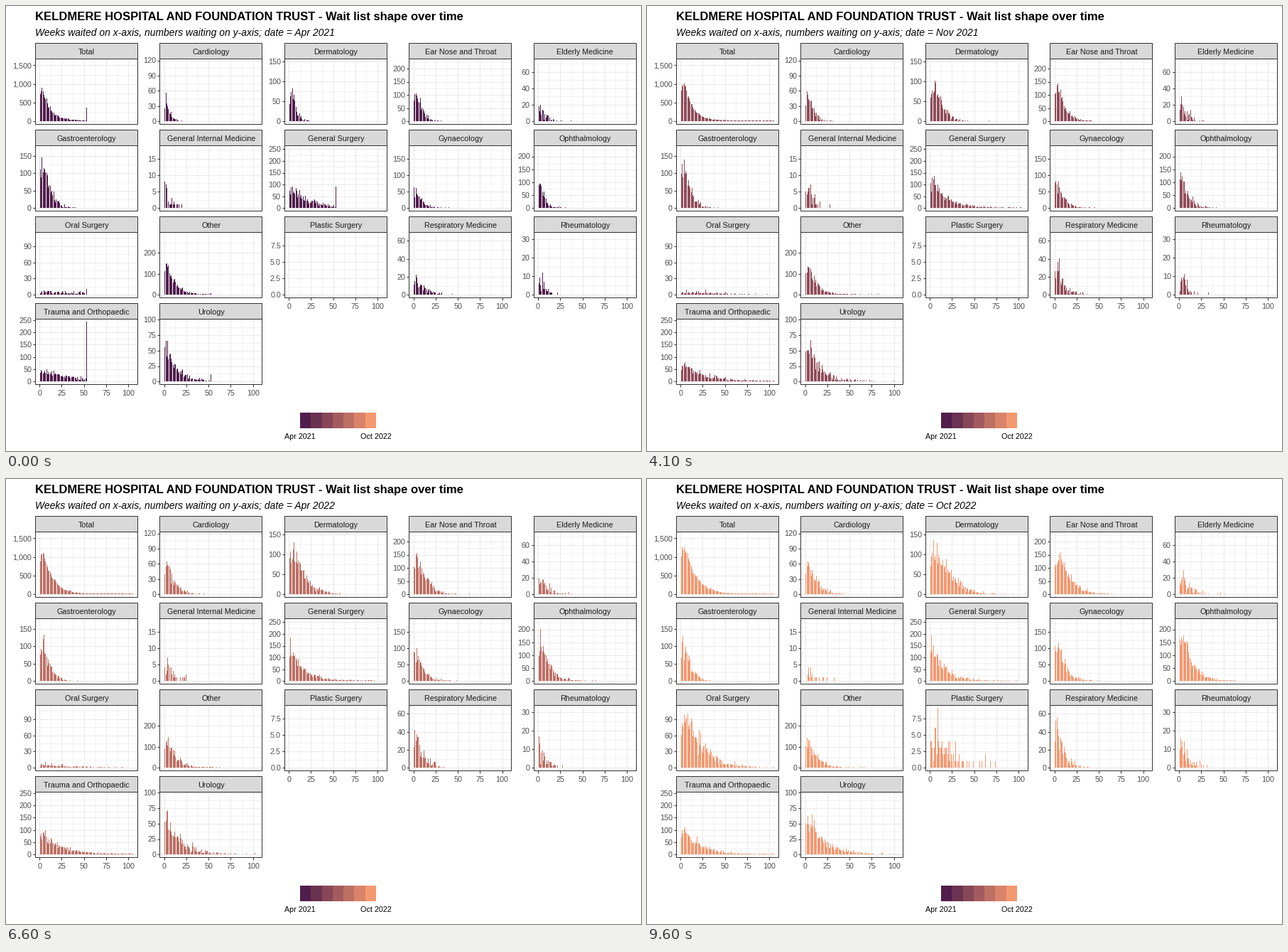
Animation of 894x626 px, one loop 10 s. Source, as a matplotlib script:

```python
import numpy as np
import matplotlib.pyplot as plt
from matplotlib.animation import FuncAnimation
from matplotlib.collections import LineCollection, PolyCollection
from matplotlib.patches import Rectangle

W, H, DPI = 894, 626, 64
plt.rcParams["font.family"] = "Liberation Sans"

MONTHS, REFORM = 19, 13               # some clinics only fill up from REFORM on
WEEKS = np.arange(1, 106)
NAMES = "Jan Feb Mar Apr May Jun Jul Aug Sep Oct Nov Dec".split()
LABELS = [f"{NAMES[(m + 3) % 12]} {2021 + (m + 3) // 12}" for m in range(MONTHS)]
DARK, LIGHT = np.array((80, 30, 76)) / 255, np.array((244, 152, 112)) / 255
INK, GREY, GRID, EDGE = "#1a1a1a", "#4d4d4d", "#ebebeb", "#333333"

# panel layout in pixels
PW, PH, STRIP = 144, 92, 22
DX, DY, LEFT, TOP = 175.45, 122, 41, 52
ZERO_X, ZERO_Y, WEEK = 6.2, PH - 3.7, 1.25

rng = np.random.default_rng(12)
panels = []


def clinic(name, top, step, peak, span, power=1.3, over=0, before=1):
    """Random weekly counts whose peak and span drift from first to last month."""
    data = np.zeros((MONTHS, len(WEEKS)))
    rise = 1 - 0.35 * np.exp(-(WEEKS - 1) / 1.5)
    for m in range(MONTHS):
        p, s = (a + (b - a) * m / (MONTHS - 1) for a, b in (peak, span))
        mean = p * rise * np.exp(-(WEEKS / s) ** power)
        if m < REFORM:
            mean *= before
        data[m] = rng.poisson(mean * rng.uniform(0.8, 1.25, len(WEEKS)))
    # the first month lumps all long waits into one bar
    data[0, WEEKS > 52] = 0
    data[0, WEEKS == 53] = over
    panels.append((name, top, step, np.minimum(data, top)))


clinic("Cardiology", 117, 30, (58, 78), (6, 13))
clinic("Dermatology", 149, 50, (90, 120), (8, 25), 1.5)
clinic("Ear Nose and Throat", 225, 50, (125, 152), (9.5, 19), 1.5)
clinic("Elderly Medicine", 72, 20, (18, 23), (9, 12))
clinic("Gastroenterology", 171, 50, (145, 128), (12, 11), 1.5)
clinic("General Internal Medicine", 18, 5, (11, 2.5), (5, 12))
clinic("General Surgery", 252, 50, (125, 220), (15, 11), 0.9, over=90)
clinic("Gynaecology", 181, 50, (78, 140), (8, 11), 1.2)
clinic("Ophthalmology", 230, 50, (150, 215), (6, 14), 1.2)
clinic("Oral Surgery", 110, 30, (95, 95), (45, 27), over=10, before=0.06)
clinic("Other", 284, 100, (200, 165), (10, 11), 1.1, over=6)
clinic("Plastic Surgery", 9, 2.5, (5, 4), (22, 26), 1.5, before=0)
clinic("Respiratory Medicine", 66, 20, (28, 58), (10, 10))
clinic("Rheumatology", 32, 10, (15, 17), (6, 9))
clinic("Trauma and Orthopaedic", 242, 50, (55, 120), (27, 19), 1, over=242)
clinic("Urology", 96, 25, (70, 76), (11, 17), 1, over=11)
total = np.minimum(sum(p[3] for p in panels), 1590)
panels.insert(0, ("Total", 1590, 500, total))

fig = plt.figure(figsize=(W / DPI, H / DPI), dpi=DPI, facecolor="white")
ax = fig.add_axes((0, 0, 1, 1))
ax.set_xlim(0, W)
ax.set_ylim(H, 0)
ax.axis("off")


def text(x, y, s, px=10.8, color="black", ha="center", **kw):
    return ax.text(x, y, s, fontsize=px * 72 / DPI, color=color, ha=ha,
                   va="baseline", zorder=6, **kw)


def lines(segs, color, px, z):
    ax.add_collection(LineCollection(segs, colors=color, zorder=z,
                                     linewidths=px * 72 / DPI))


def box(x, y, w, h, fill, edge, z):
    ax.add_patch(Rectangle((x, y), w, h, facecolor=fill, edgecolor=edge,
                           linewidth=72 / DPI if edge != "none" else 0, zorder=z))


def shade(m):
    return DARK + (LIGHT - DARK) * m / (MONTHS - 1)


def tick_text(v, step):
    return f"{v:.1f}" if step < 5 else f"{v:,.0f}"


def corner(i):
    return LEFT + i % 5 * DX, TOP + i // 5 * DY + STRIP


def unit(top):
    return PH / 1.1 / top


major, minor, ticks = [], [], []
for i, (name, top, step, _) in enumerate(panels):
    x, y = corner(i)
    box(x, y - STRIP, PW, STRIP, "#d9d9d9", EDGE, 5)
    box(x, y, PW, PH, "none", EDGE, 5)
    text(x + PW / 2 + 0.5, y - 6.5, name, color=INK)
    for k in range(20):
        value = k * step / 2
        if value > top * 1.05:
            break
        ty = y + ZERO_Y - value * unit(top)
        (minor if k % 2 else major).append([(x, ty), (x + PW, ty)])
        if k % 2 == 0:
            ticks.append([(x - 3, ty), (x, ty)])
            text(x - 5, ty + 3.9, tick_text(value, step), color=GREY, ha="right")
    for k in range(9):
        tx = x + ZERO_X + 12.5 * k * WEEK
        (minor if k % 2 else major).append([(tx, y), (tx, y + PH)])
        if i + 5 >= len(panels) and k % 2 == 0:
            ticks.append([(tx, y + PH), (tx, y + PH + 4)])
            text(tx, y + PH + 15.7, f"{12.5 * k:.0f}", color=GREY)
lines(minor, GRID, 0.6, 1)
lines(major, GRID, 1.1, 1)
lines(ticks, EDGE, 1, 4)

text(41, 20.3, "KELDMERE HOSPITAL AND FOUNDATION TRUST - Wait list shape over time",
     16.65, ha="left", weight="bold")
subtitle = text(41, 42, "", 13.87, ha="left", style="italic")

# colour key
for k in range(7):
    box(414 + k * 107 / 7, 572, 107 / 7, 22, shade(3 * k), "none", 2)
text(413.5, 609, LABELS[0])
text(521, 609, LABELS[-1])

bars = PolyCollection([], antialiaseds=False, linewidths=0, zorder=3)
ax.add_collection(bars, autolim=False)

# one blend frame after each hold; the first five holds are a frame longer
starts = [0] + [5 * m + min(m, 5) + 1 for m in range(1, MONTHS)]


def draw(n):
    m = max(k for k in range(MONTHS) if starts[k] <= n)
    blend = m + 1 < MONTHS and n == starts[m + 1] - 1
    verts = []
    for i, (_, top, _, data) in enumerate(panels):
        x, y = corner(i)
        zero = round(y + ZERO_Y)
        counts = (data[m] + data[m + 1]) / 2 if blend else data[m]
        for w in WEEKS[counts > 0]:
            x0 = round(x + ZERO_X + WEEK * (w - 0.45))
            y1 = zero - max(round(counts[w - 1] * unit(top)), 1)
            verts.append([(x0, zero), (x0, y1), (x0 + 1, y1), (x0 + 1, zero)])
    bars.set_verts(verts)
    bars.set_facecolor(shade(m + 0.5 * blend))
    subtitle.set_text("Weeks waited on x-axis, numbers waiting on y-axis; "
                      f"date = {LABELS[m]}")
    return bars, subtitle


anim = FuncAnimation(fig, draw, frames=100, interval=100, repeat=True,
                     repeat_delay=0, blit=False)
plt.show()
```
